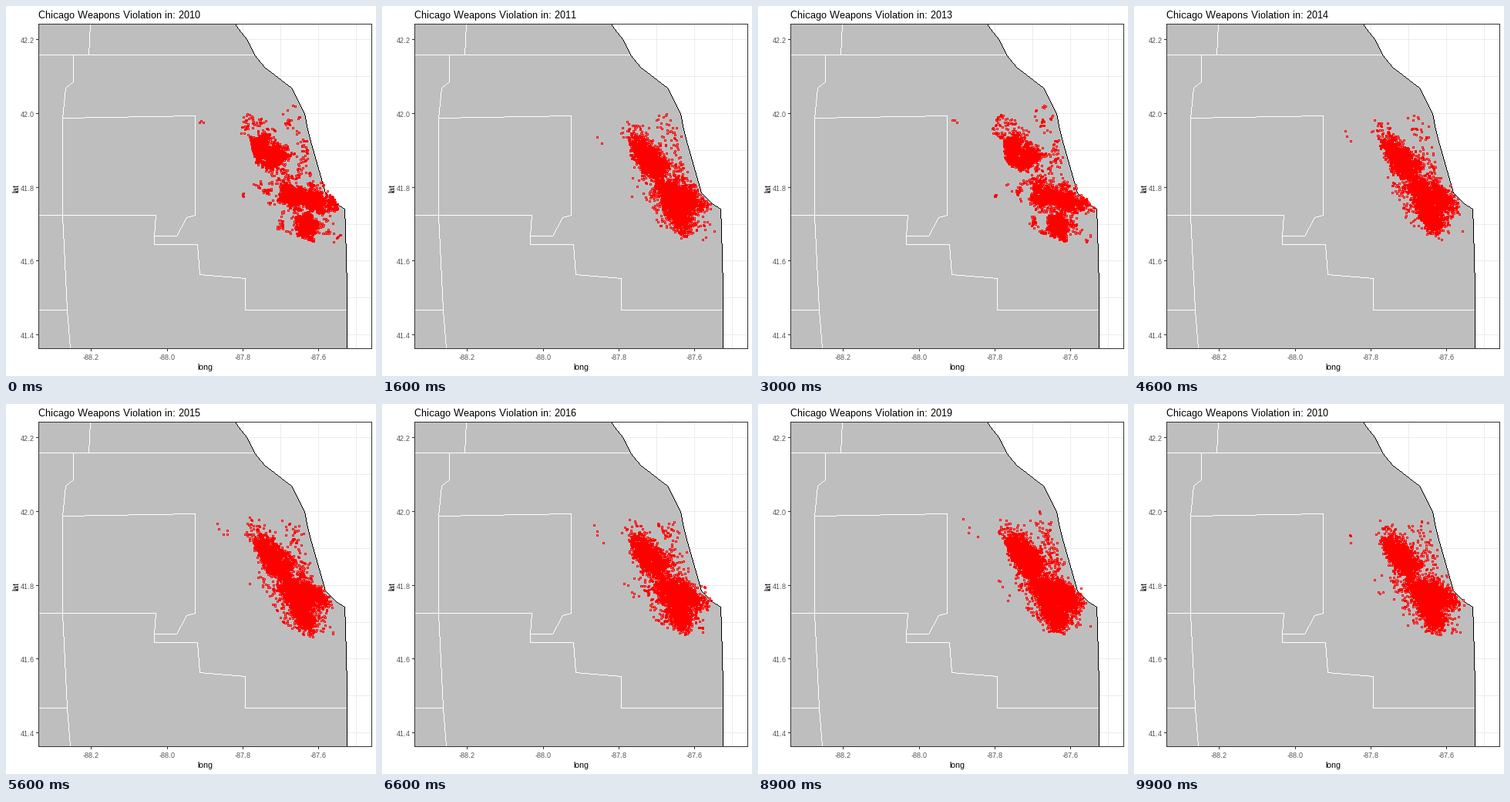
A matplotlib script that plays this animation: 480x480 px, repeating every 10000 ms.

```python
from itertools import pairwise

import numpy as np
import matplotlib.pyplot as plt
from matplotlib.animation import FuncAnimation
from matplotlib.patches import Polygon
from matplotlib.path import Path

SIZE, DPI = 480, 96
PX = 72 / DPI                      # points per pixel
LEFT, RIGHT, TOP, BOTTOM = 42, 474, 24, 445
FIRST_YEAR, YEARS = 2010, 10
STEPS, HOLD = 10, 6                # frames per year, frames at rest

COAST = [(297, 24), (301, 30), (313, 45), (322, 64), (335, 80), (370, 107),
         (387, 140), (391, 161), (396, 180), (414, 243), (428, 257),
         (439, 264), (440, 290), (442, 365), (442, 445)]

COUNTIES = [
    [(109, 24), (107, 64)],
    [(42, 64), (322, 64)],
    [(87, 64), (87, 99), (77, 107), (73, 146), (245, 143), (245, 272),
     (234, 275), (221, 299), (192, 299), (194, 272), (42, 272)],
    [(73, 146), (73, 272), (79, 395), (83, 445)],
    [(42, 395), (79, 395)],
    [(192, 299), (192, 310), (248, 310), (251, 349), (310, 354),
     (310, 395), (442, 395)],
]

CITY = Path([(364, 128), (378, 129), (392, 178), (402, 212), (418, 241),
             (439, 264), (439, 307), (400, 306), (348, 288), (360, 262),
             (306, 247), (308, 233), (342, 220), (320, 200), (318, 174),
             (302, 166), (308, 138), (340, 148), (364, 128)])

# busy districts: centre x, centre y, spread x, spread y
WEST, SOUTH = [(329, 183, 6, 9), (350, 198, 8, 9)], [
    (374, 245, 11, 9), (404, 252, 14, 7), (390, 286, 7, 8)]


def inside(xy):
    return xy[CITY.contains_points(xy)]


def make_corners(rng):
    """Street corners where reports pile up, with their share of reports."""
    busy = [rng.normal(d[:2], d[2:], (45, 2)) for d in WEST + SOUTH]
    busy = inside(np.concatenate(busy))
    quiet = inside(rng.uniform((300, 126), (440, 308), (180, 2)))
    share = np.r_[np.ones(len(busy)), np.full(len(quiet), .3)]
    share *= rng.uniform(.3, 1.7, len(share))
    return np.concatenate([busy, quiet]), share / share.sum()


def make_year(index, corners, share):
    rng = np.random.default_rng(FIRST_YEAR + index)
    n = 3600 + 650 * max(0, index - 6)
    around = corners[rng.choice(len(corners), 2 * n, p=share)]
    xy = inside(rng.normal(around, (3, 2.4)))[:n]
    strays = rng.integers(2, 6)    # a few far out at the airport
    xy[rng.integers(0, 3000, strays)] = rng.normal((255, 150), (4, 1),
                                                   (strays, 2))
    return xy


corners, share = make_corners(np.random.default_rng(7))
years = [make_year(i, corners, share) for i in range(YEARS)]

plt.rcParams.update({"font.family": "Liberation Sans",
                     "text.hinting": "native", "text.hinting_factor": 1})
fig = plt.figure(figsize=(SIZE / DPI, SIZE / DPI), dpi=DPI, facecolor="white")
ax = fig.add_axes([0, 0, 1, 1])
ax.set_xlim(0, SIZE)
ax.set_ylim(SIZE, 0)
ax.axis("off")


def line(points, color, z):
    """Crisp line, one pixel wide, without smoothing."""
    for a, b in pairwise(np.array(points)):
        xy = np.round(np.linspace(a, b, int(abs(b - a).max()) + 1))
        ax.plot(xy[:, 0], xy[:, 1], ls="none", marker=",", color=color,
                mew=0, zorder=z)


def label(x, y, text, size, color="black", **kw):
    return ax.text(x, y, text, fontsize=size * PX, color=color,
                   va="baseline", zorder=8, **kw)


def tick_x(i):
    return round(110.3 + 98.3 * i)


def tick_y(i):
    return round(44.3 + 95.7 * i)


for i in np.arange(0, 4, .5):
    line([(tick_x(i), TOP), (tick_x(i), BOTTOM)], "#ebebeb", 1)
for i in np.arange(0, 4.5, .5):
    line([(LEFT, tick_y(i)), (RIGHT, tick_y(i))], "#ebebeb", 1)

ax.add_patch(Polygon(COAST + [(LEFT, BOTTOM), (LEFT, TOP)], fc="#bebebe",
                     ec="none", aa=False, zorder=2))
for county in COUNTIES:
    line(county, "white", 3)
line(COAST, "black", 4)

dots, = ax.plot([], [], ls="none", marker="s", ms=2 * PX, mew=PX, mec="red",
                mfc="none", aa=False, zorder=5)

line([(LEFT, TOP), (RIGHT, TOP), (RIGHT, BOTTOM), (LEFT, BOTTOM),
      (LEFT, TOP)], "#333333", 6)
for i in range(4):
    x = tick_x(i)
    line([(x, BOTTOM), (x, BOTTOM + 3)], "#333333", 6)
    label(x, 459, f"{-88.2 + .2 * i:.1f}", 9, "#4d4d4d", ha="center")
for i in range(5):
    y = tick_y(i)
    line([(LEFT - 3, y), (LEFT, y)], "#333333", 6)
    label(37, y + 4, f"{42.2 - .2 * i:.1f}", 9, "#4d4d4d", ha="right")

label(258, 472, "long", 11, ha="center")
label(16, 237, "lat", 11, ha="center", rotation=90, rotation_mode="anchor")
title = label(42, 16, "", 13, ha="left")


def draw(frame):
    index, step = divmod(frame, STEPS)
    after = (index + 1) % YEARS
    t = max(0, step - HOLD + 1) / (STEPS - HOLD + 1)
    xy = years[index]
    if t > 0:
        n = min(len(xy), len(years[after]))
        xy = (1 - t) * xy[:n] + t * years[after][:n]
    dots.set_data(xy[:, 0], xy[:, 1])
    shown = after if t > .5 else index
    title.set_text(f"Chicago Weapons Violation in: {FIRST_YEAR + shown}")
    return dots, title


anim = FuncAnimation(fig, draw, frames=STEPS * YEARS, interval=100,
                     repeat=True, repeat_delay=0, blit=False)
plt.show()
```
